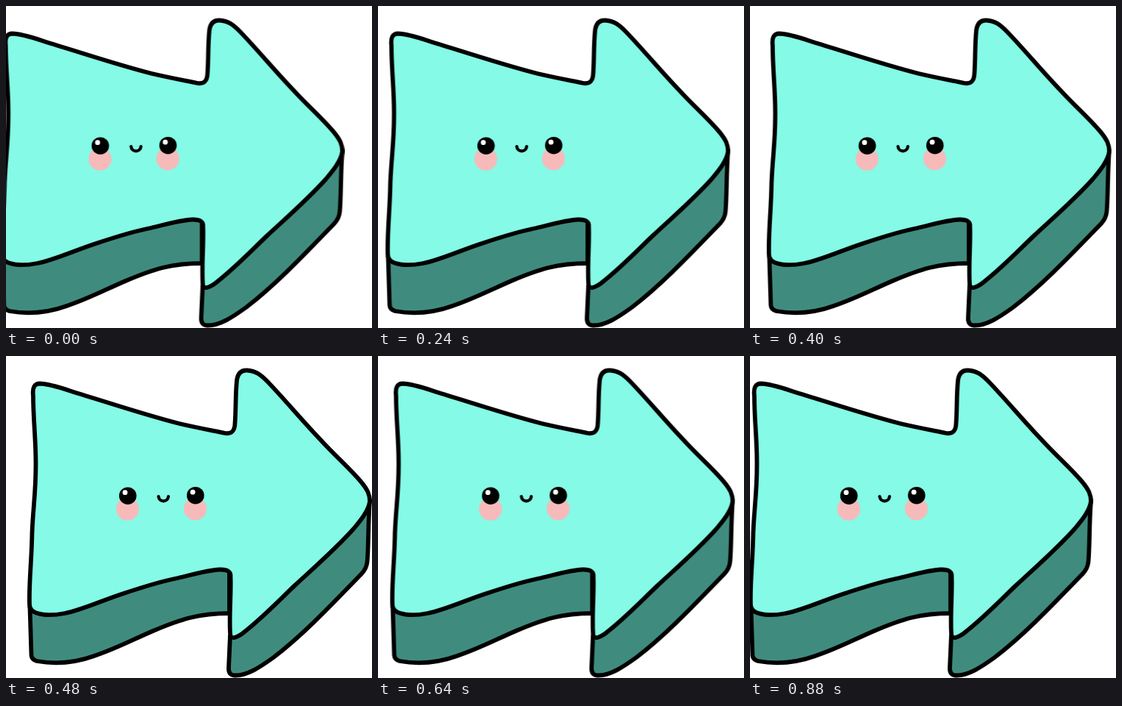
An HTML page for the animation above (0.96 s loop, 498 px wide and 438 px high).

```html
<!DOCTYPE html>
<html lang="en">
<head>
<meta charset="utf-8">
<title>Arrow</title>
<style>
  html, body { margin: 0; width: 100%; height: 100%; overflow: hidden; background: #fff; }
  svg { display: block; width: 498px; height: 438px; }
  .line { stroke: #000; stroke-width: 5.8; stroke-linejoin: round; stroke-linecap: round; }
  .side { fill: #3f8c7f; }
  .face { fill: #85fae6; }
  .cheek { fill: #f7babb; }
  .glint { fill: #fff; }
  .mouth { fill: none; stroke: #000; stroke-width: 4.2; stroke-linecap: round; }
  #arrow { animation: nudge 960ms infinite; }
  /* six held steps out, six held steps back */
  @keyframes nudge {
    0%, 100% { transform: translateX(-37.4px); animation-timing-function: steps(6, end); }
    50% { transform: translateX(0); animation-timing-function: steps(6, end); }
  }
</style>
</head>
<body>
<svg viewBox="0 0 498 438">
  <defs>
    <g id="eye">
      <circle class="cheek" cx="-.3" cy="18" r="15.6"/>
      <circle r="11.8"/>
      <circle class="glint" cx="-3.7" cy="-4.5" r="3.4"/>
    </g>
  </defs>
  <g id="arrow">
    <path class="line side" d="M32.500 342 L34.500 407 Q35 413 42 415
      C70 420 95 417 120 408 C150 398 172 386 200 374
      C238 358 262 350 304 350 V270 L60 300 Z"/>
    <path class="line side" d="M305 380 L303 424 Q302.500 434 311 434.500
      C328 435 346 423 364 410 C406 378 448 333 484 296
      Q490.500 289 491.500 280 C493.500 258 492.500 230 495 196 Z"/>
    <path class="line face" d="M37 54 Q35 37.500 46 37.500
      C62 38 82 46 102 52 C150 67 196 82 236 92 C262 98 284 102 298 105
      Q311 107 311.500 92 C313 72 312 55 314 34
      Q315.500 19 328 19.500 C340 20 347 26 356 35
      C380 60 404 89 428 114 C448 136 466 151 483 171
      C492 182 495 188 495 198 C493 211 483 223 473 235
      C448 263 420 287 392 313 C370 334 350 355 326 374
      Q318 381 311 383 Q305 384 305 377
      C303.500 350 306.500 325 305.500 300 Q306.500 290 291 290.500
      C272 291.500 252 298 234 302 C208 307 184 315 160 323
      C132 332 102 346 80 350 C64 353 52 353 43 350
      Q32 347 32 338 C31 308 35 278 35.500 240
      C37 205 40.500 185 40.500 150 C41 116 37 88 37 54 Z"/>
    <use href="#eye" x="165.700" y="190.200"/>
    <use href="#eye" x="257.800" y="189.700"/>
    <path class="mouth" d="M207.500 191 C208.500 199.500 220 199.500 221 191"/>
  </g>
</svg>
</body>
</html>
```
